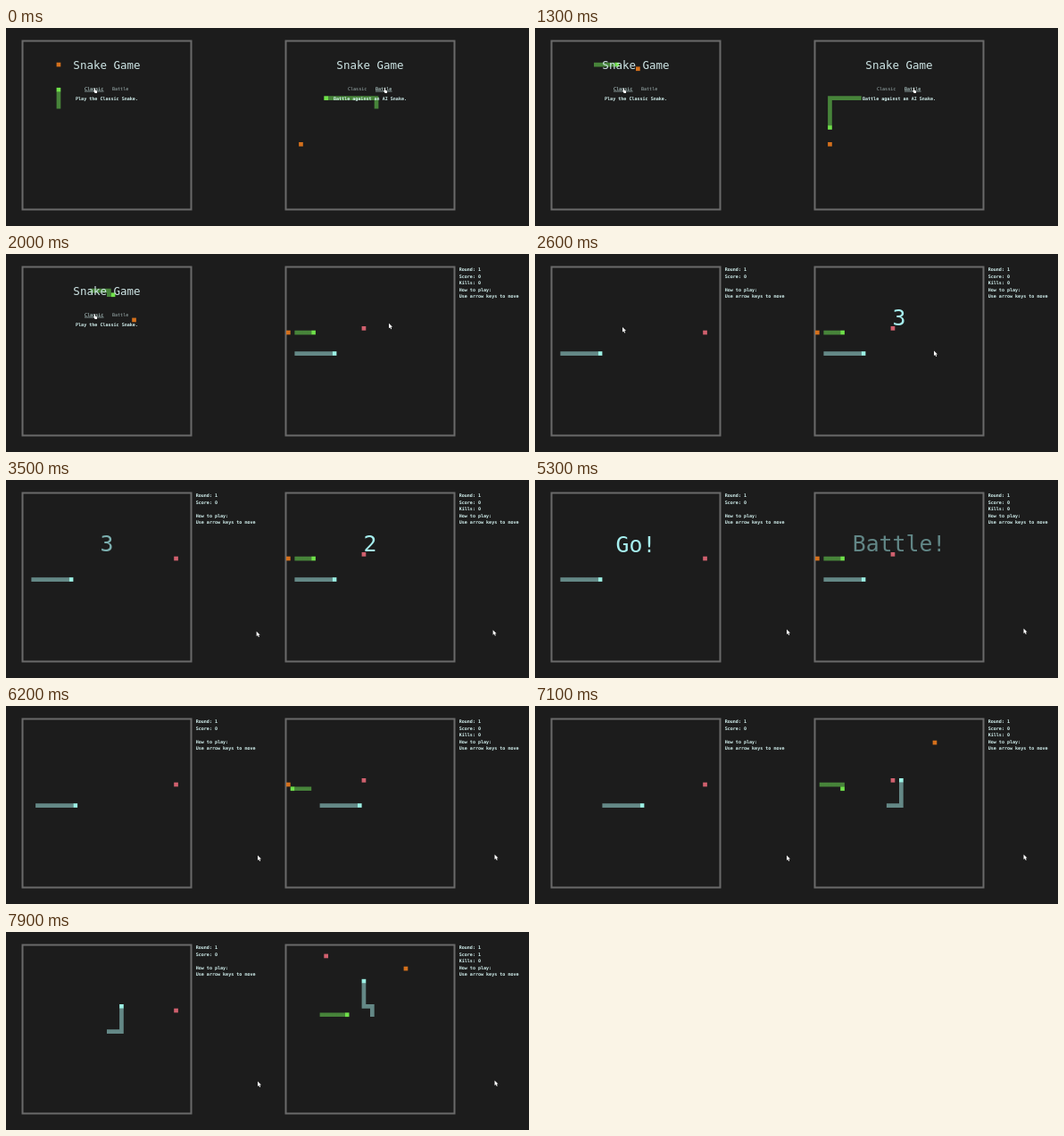
These frames come from a looping animation (586x222 px, 8000 ms). An HTML page:

```html
<!DOCTYPE html>
<html lang="en">
<head>
<meta charset="utf-8">
<title>Snake Game</title>
<style>
  html, body { margin: 0; width: 100%; height: 100%; overflow: hidden; background: #1c1c1c; }
  svg { display: block; width: 586px; height: 222px; }
  text { font: 5.05px "DejaVu Sans Mono", "Noto Sans Mono", monospace; fill: #d4f2f0; white-space: pre; }
  .frame { fill: none; stroke: #6a6a6a; stroke-width: 2; }
  .mid { text-anchor: middle; }
  .title { font-size: 12.5px; fill: #cfe6e6; }
  .item { fill: #a3b5b5; }
  .hover { fill: #d4f2f0; }
  .line { stroke: #b4cccc; stroke-width: .7; }
  .bold { font-weight: bold; }
  .count { font-size: 24.8px; fill: #a6f0f0; }
  .cursor { fill: #fff; }
</style>
</head>
<body>
<svg id="stage" viewBox="0 0 586 222"></svg>
<script>
const LOOP = 8000, STEP = 100, CELL = 4.7;
const GREEN = ['#47843a', '#6fe04a'], TEAL = ['#648886', '#9cf0e4'];
const ORANGE = '#d4701c', RED = '#d0606e';
const ARROW = 'M0 0V5.6L1.3 4.4L2.3 6.6L3.2 6.2L2.3 4.1H4Z';
const HAND = 'M1 0V2.8L0 2.6L1.6 5.6H4V2.9L2 2.2V0Z';

// Snakes: corner points from tail onward, starting length, start time, steps at which they eat.
// Foods: [from step, column, row], each replaced by the next.
const boards = [
  {
    x: 0, hover: 0, desc: 'Play the Classic Snake.', play: 2300, count: 2900, go: 'Go!',
    menu: [{ path: [[8,15],[8,5],[20,5],[20,6],[26,6]], len: 5, start: 0, eats: [6, 19],
      skin: GREEN, food: ORANGE, foods: [[0,8,5],[6,20,6],[19,26,12]] }],
    game: [{ path: [[2,20],[23,20],[23,5]], len: 10, start: 6100, eats: [],
      skin: TEAL, food: RED, foods: [[0,36,15]] }],
    mouse: [[2300,98,67.5],[2500,98,82],[2600,98,82],[2700,112,98],[3100,240,168],[3300,278,174],[3600,282,167.5]]
  },
  {
    x: 295, hover: 1, desc: 'Battle against an AI Snake.', play: 1900, count: 2320, go: 'Battle!',
    menu: [{ path: [[21,15],[21,13],[3,13],[3,24],[9,24]], len: 15, start: 0, eats: [17],
      skin: GREEN, food: ORANGE, foods: [[0,3,24],[17,20,34]] }],
    game: [
      { path: [[2,20],[20,20],[20,14],[18,14],[18,5]], len: 10, start: 5600, eats: [17],
        skin: TEAL, food: RED, foods: [[0,18,14],[17,9,2]] },
      { path: [[2,15],[6,15],[6,16],[0,16],[0,15],[6,15],[6,16],[20,16]], len: 5, start: 5600, eats: [8, 15],
        skin: GREEN, food: ORANGE, foods: [[0,0,15],[8,6,16],[15,28,5]] }
    ],
    mouse: [[1900,423,67.5],[2300,447,108.5],[2600,447,108.5],[2900,500,150],[3200,540,173],[3600,547.5,166.5]]
  }
];

function expand(points) {
  const cells = [points[0]];
  for (const [px, py] of points.slice(1)) {
    let [x, y] = cells[cells.length - 1];
    while (x !== px || y !== py) {
      x += Math.sign(px - x);
      y += Math.sign(py - y);
      cells.push([x, y]);
    }
  }
  return cells;
}

const square = ([x, y]) => {
  const left = (19 + x * CELL).toFixed(2), top = (15.2 + y * CELL).toFixed(2);
  return `M${left} ${top}h${CELL}v${CELL}h-${CELL}z`;
};
const fill = (cells, color) => `<path fill="${color}" d="${cells.map(square).join('')}"/>`;
const stepsOf = (s, t) => Math.max(0, Math.floor((t - s.start) / STEP));
const eaten = (s, t) => s.eats.filter(e => e <= stepsOf(s, t)).length;

function drawSnake(s, t) {
  const n = stepsOf(s, t), head = s.len - 1 + n, size = s.len + eaten(s, t);
  const food = s.foods.filter(f => f[0] <= n).pop().slice(1);
  return fill([food], s.food)
    + fill(s.cells.slice(Math.max(0, head - size + 1), head), s.skin[0])
    + fill([s.cells[head]], s.skin[1]);
}

function menuText(b) {
  const [x1, x2] = b.hover ? [119, 137.5] : [88, 109.5];
  return `<text class="mid title" x="113" y="46.4">Snake Game</text>
    <text class="item ${b.hover ? '' : 'hover'}" x="88" y="70">Classic</text>
    <text class="item ${b.hover ? 'hover' : ''}" x="119" y="70">Battle</text>
    <path class="line" d="M${x1} 71H${x2}"/>
    <text class="mid bold" x="113" y="80.8">${b.desc}</text>`;
}

function sideText(b, t) {
  const rows = ['Round: 1', 'Score: ' + eaten(b.game[0], t), b.hover ? 'Kills: 0' : '',
    'How to play:', 'Use arrow keys to move'];
  return rows.map((row, i) => `<text class="bold" x="212.7" y="${19 + i * 7.6}">${row}</text>`).join('');
}

// Each word drops in with a small overshoot, then fades away.
function countdown(b, t) {
  const period = 760, since = t - b.count;
  if (since < 0) return '';
  const i = Math.min(3, Math.floor(since / period)), age = since - i * period;
  if (age >= 950) return '';
  const u = Math.min(1, age / 300) - 1;
  const drop = 1 + 2.7 * u ** 3 + 1.7 * u ** 2;
  const alpha = Math.min(1, age / 60, (950 - age) / 500);
  return `<text class="mid count" x="113" y="${30 + 50 * drop}" opacity="${alpha}">${['3', '2', '1', b.go][i]}</text>`;
}

function cursor(b, t) {
  const m = b.mouse;
  let i = m.findIndex(p => p[0] > t);
  if (i < 0) i = m.length - 1;
  const to = m[i], from = m[Math.max(0, i - 1)];
  const k = to === from ? 0 : Math.min(1, (t - from[0]) / (to[0] - from[0]));
  const x = from[1] + (to[1] - from[1]) * k, y = from[2] + (to[2] - from[2]) * k;
  return `<path class="cursor" transform="translate(${x} ${y})" d="${t < b.play ? HAND : ARROW}"/>`;
}

function drawBoard(b, t) {
  const playing = t >= b.play;
  const snakes = (playing ? b.game : b.menu).map(s => drawSnake(s, t)).join('');
  const words = playing ? sideText(b, t) + countdown(b, t) : menuText(b);
  return `<g transform="translate(${b.x} 0)"><rect class="frame" x="18.5" y="14.5" width="189" height="189"/>
    ${snakes}${words}</g>${cursor(b, t)}`;
}

for (const b of boards) for (const s of [...b.menu, ...b.game]) s.cells = expand(s.path);

const stage = document.getElementById('stage');
let shown = -1;
function draw() {
  const t = Math.floor(performance.now() % LOOP / STEP) * STEP;
  if (t !== shown) {
    stage.innerHTML = boards.map(b => drawBoard(b, t)).join('');
    shown = t;
  }
  requestAnimationFrame(draw);
}
draw();
</script>
</body>
</html>
```
